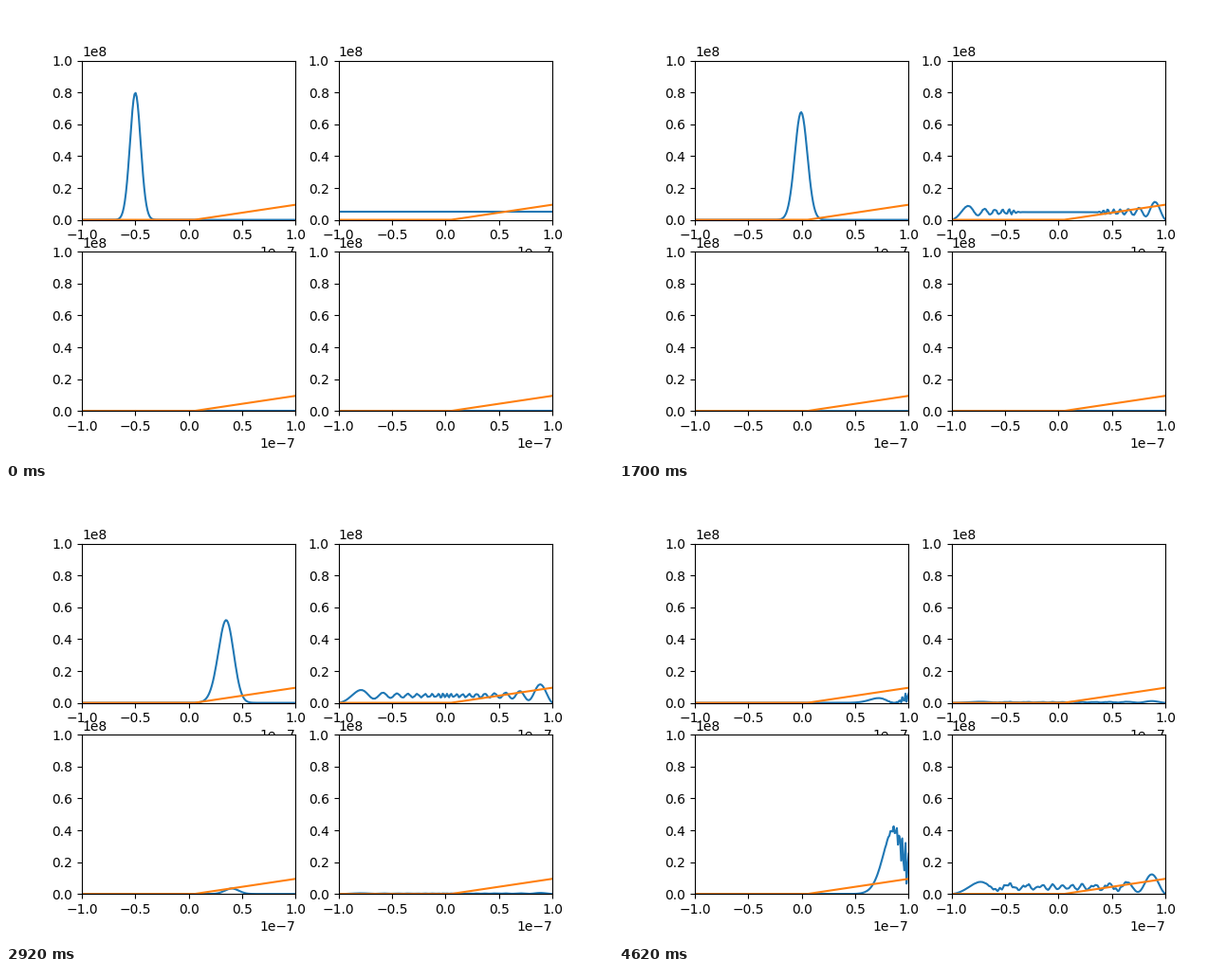
Animation, 640 px wide and 480 px high, one loop 4.64 s. Source, as a matplotlib script:

```python
import numpy as np
import matplotlib.pyplot as plt
from matplotlib.animation import FuncAnimation

FRAMES, INTERVAL = 232, 20

# Lengths in nm, time in frames, hbar = 1
N = 200
x = np.linspace(-100, 100, N)
dx = x[1] - x[0]
DIFFUSION = 0.3473       # hbar / 2m, nm^2 per frame
COUPLING = 2.77e-4       # flip rate per nm of ramp
SIGMA, K_PACKET = 5.0, 1.0
K_WALL = 0.115           # wave number of the flat state at the right wall

ramp = np.maximum(x - 5, 0)
kinetic = DIFFUSION / dx**2 * (2 * np.eye(N) - np.eye(N, k=1) - np.eye(N, k=-1))
times = np.arange(FRAMES)


def evolve(potential, start):
    """States at all times as rows, for a hard-walled box."""
    energy, modes = np.linalg.eigh(kinetic + np.diag(potential))
    weights = modes.T @ start
    return (np.exp(-1j * np.outer(times, energy)) * weights) @ modes.T


def density(psi):
    return np.abs(psi)**2 * 1e9


# Moving packet with two internal levels mixed by the ramp
packet = np.exp(-(x + 50)**2 / (4 * SIGMA**2) + 1j * K_PACKET * x)
packet /= np.sqrt(np.sum(np.abs(packet)**2) * dx)
plus = evolve(COUPLING * ramp, packet)
minus = evolve(-COUPLING * ramp, packet)
upper = density((plus + minus) / 2)
lower = density((plus - minus) / 2)
flipped = lower.sum(axis=1) / (upper + lower).sum(axis=1)

# Flat state, shared between the levels in the same proportion
flat = np.exp(1j * K_WALL * (x + 100)**2 / 400) / np.sqrt(200)
spread = density(evolve(np.zeros(N), flat))
share = flipped[:, None]
curves = [upper, spread * (1 - share), lower, spread * share]

fig, axes = plt.subplots(2, 2, figsize=(6.4, 4.8), dpi=100)
lines = []
for ax, curve in zip(axes.flat, curves):
    lines += ax.plot(x * 1e-9, curve[0])
    ax.plot(x * 1e-9, ramp * 1e5)
    ax.set_xlim(-1e-7, 1e-7)
    ax.set_ylim(0, 1e8)


def update(i):
    for line, curve in zip(lines, curves):
        line.set_ydata(curve[i])
    return lines


anim = FuncAnimation(fig, update, frames=FRAMES, interval=INTERVAL,
                     repeat=True, repeat_delay=0)
plt.show()
```
